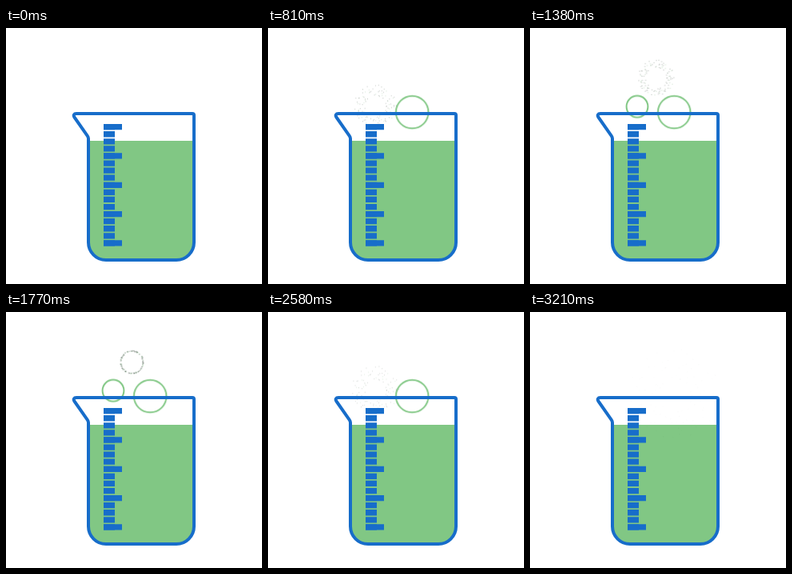
Write an HTML page without scripts that moves like this. It is 320 px wide and 320 px high and loops after 3.36 s.

```html
<!DOCTYPE html>
<html lang="en">
<head>
<meta charset="utf-8">
<title>Bubbling beaker</title>
<style>
@property --t { syntax: "<length>"; inherits: true; initial-value: 0px; }

html, body { margin: 0; width: 100%; height: 100%; overflow: hidden; background: #fff; }
svg { display: block; width: 100vw; height: 100vh; }

.glass { fill: none; stroke: #176dca; stroke-width: 4; stroke-linejoin: round; }
.tick { stroke: #176dca; }
.liquid { fill: #81c784; }

.ring { fill: none; stroke: #81c784; stroke-width: 2; r: var(--r); }

/* Each shell is a circle of loose specks; --t is the spread, --k its share of it */
.shell {
  fill: none; stroke: #26382a; stroke-width: .85; stroke-linecap: round;
  stroke-dasharray: 0 7 0 13 0 4 0 17 0 9 0 11 0 5 0 19 0 8 0 14;
  r: calc(var(--r) + var(--t) * var(--k));
  cx: calc(var(--t) * var(--x));
  cy: calc(var(--t) * var(--y));
}
.shell:nth-child(3n) { stroke: #62a866; }

.ring, .dust { opacity: 0; animation: 3360ms step-end infinite; }
.a { --r: 20.3px; }
.b { --r: 13.4px; }
.c { --r: 13.4px; }
.a .ring { animation-name: ring-a; }
.b .ring { animation-name: ring-b; }
.c .ring { animation-name: ring-c; }
.a .dust { animation-name: dust-a; }
.b .dust { animation-name: dust-b; }
.c .dust { animation-name: dust-c; }

@keyframes ring-a { 0%, 84.82% { opacity: 0 } 16.07% { opacity: 1 } }
@keyframes ring-b { 0%, 68.75% { opacity: 0 } 35.71% { opacity: 1 } }
@keyframes ring-c { 0%, 52.67% { opacity: 0 } 48.21% { opacity: 1 } }

@keyframes dust-a {
  0% { opacity: 0 }
  3.57% { opacity: .2; --t: 34px; animation-timing-function: steps(12) }
  14.28% { opacity: .95; --t: 2.5px; animation-timing-function: steps(2) }
  16.06% { opacity: 1; --t: 0px }
  16.07% { opacity: 0; --t: 0px }
  84.82% { opacity: .9; --t: 0px; animation-timing-function: steps(12, start) }
  95.53% { opacity: .05; --t: 40px }
  100% { opacity: 0; --t: 40px }
}
@keyframes dust-b {
  0% { opacity: 0 }
  20.53% { opacity: .25; --t: 18.5px; animation-timing-function: steps(17) }
  35.7% { opacity: 1; --t: 0px }
  35.71% { opacity: 0; --t: 0px }
  68.75% { opacity: .9; --t: 0px; animation-timing-function: steps(13, start) }
  80.34% { opacity: .1; --t: 23px }
  80.35% { opacity: 0; --t: 23px }
}
@keyframes dust-c {
  0% { opacity: 0 }
  36.6% { opacity: .25; --t: 16px; animation-timing-function: steps(13) }
  48.2% { opacity: 1; --t: 0px }
  48.21% { opacity: 0; --t: 0px }
  52.67% { opacity: .9; --t: 0px; animation-timing-function: steps(13, start) }
  64.27% { opacity: .15; --t: 17px }
  64.28% { opacity: 0; --t: 17px }
}
</style>
</head>
<body>
<svg viewBox="0 0 320 320">
  <defs>
    <g id="dust">
      <circle class="shell" pathLength="107" style="--k:.02;--x:.04;--y:-.03"/>
      <circle class="shell" pathLength="101" stroke-dashoffset="31" style="--k:.12;--x:-.08;--y:.05"/>
      <circle class="shell" pathLength="113" stroke-dashoffset="64" style="--k:.22;--x:.1;--y:.08"/>
      <circle class="shell" pathLength="95" stroke-dashoffset="17" style="--k:.31;--x:-.1;--y:-.1"/>
      <circle class="shell" pathLength="109" stroke-dashoffset="83" style="--k:.4;--x:.12;--y:-.06"/>
      <circle class="shell" pathLength="98" stroke-dashoffset="46" style="--k:.48;--x:-.04;--y:.12"/>
      <circle class="shell" pathLength="104" stroke-dashoffset="71" style="--k:.57;--x:-.12;--y:-.04"/>
      <circle class="shell" pathLength="92" stroke-dashoffset="9" style="--k:.65;--x:.06;--y:-.12"/>
      <circle class="shell" pathLength="111" stroke-dashoffset="55" style="--k:.72;--x:.12;--y:.06"/>
      <circle class="shell" pathLength="100" stroke-dashoffset="92" style="--k:.8;--x:-.08;--y:-.1"/>
      <circle class="shell" pathLength="89" stroke-dashoffset="24" style="--k:.88;--x:.02;--y:-.08"/>
    </g>
  </defs>

  <path class="liquid" d="M103 141H235V268A22 22 0 0 1 213 290H125A22 22 0 0 1 103 268Z"/>

  <g class="a" transform="translate(180.2 105.2)"><circle class="ring"/><use class="dust" href="#dust"/></g>
  <g class="b" transform="translate(134 98.2)"><circle class="ring"/><use class="dust" href="#dust"/></g>
  <g class="c" transform="translate(157.5 62.8)"><circle class="ring"/><use class="dust" href="#dust"/></g>

  <path class="tick" d="M129 120V272.6" stroke-width="14" stroke-dasharray="7.3 1.78"/>
  <path class="tick" d="M133.5 120V272.6" stroke-width="23" stroke-dasharray="7.3 29.02"/>
  <path class="glass" d="M88 107H233Q235 107 235 109V268A22 22 0 0 1 213 290H125A22 22 0 0 1 103 268V138.5Q103 136.5 101.8 134.8L85.8 112C83.6 109 85 107 88 107Z"/>
</svg>
</body>
</html>
```
